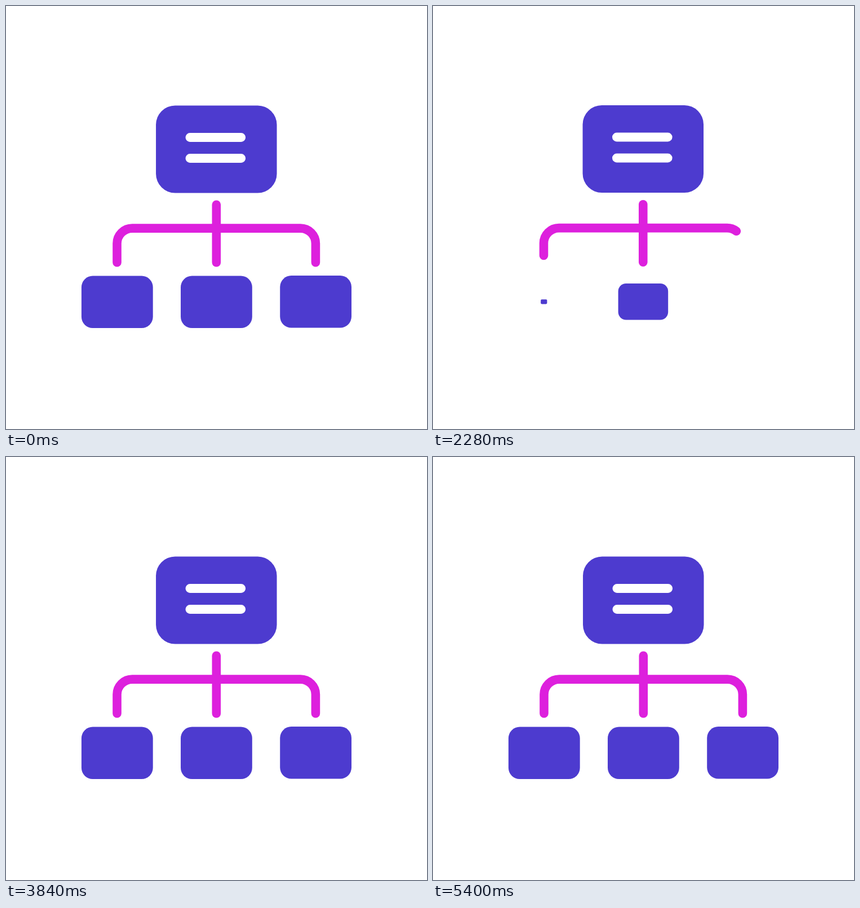
Write an HTML page with a canvas that moves like this. It is 747 by 750 pixels and loops after 5840 ms.

```html
<!DOCTYPE html>
<html lang="en">
<head>
<meta charset="utf-8">
<title>Hierarchy chart</title>
<style>
  html, body { margin: 0; width: 100%; height: 100%; overflow: hidden; background: #fff; }
  canvas { display: block; }
</style>
</head>
<body>
<canvas id="stage" width="747" height="750"></canvas>
<script>
const ctx = document.getElementById('stage').getContext('2d');
const LOOP = 5840, STEP = 20;
const BLUE = '#4d3bcf', PINK = '#dd20dd', WHITE = '#fff';
const REDRAW = 1300, SETTLED = 2500;

const clamp = v => Math.min(1, Math.max(0, v));
const ramp = (t, start, span) => clamp((t - start) / span);
const easeOut = p => 1 - Math.pow(1 - p, 1.5);
const smooth = p => p * p * (3 - 2 * p);
const grow = (t, start, span) => easeOut(ramp(t, start, span));
const pulse = (t, peak) => 1 + 0.1 * smooth(clamp(1 - Math.abs(t - peak) / 350));

// Rounded box scaled about its centre
function box(cx, cy, w, h, r, scale) {
  if (scale <= 0) return;
  ctx.fillStyle = BLUE;
  ctx.beginPath();
  ctx.roundRect(cx - w * scale / 2, cy - h * scale / 2, w * scale, h * scale, r * scale);
  ctx.fill();
}

// First part of a round-capped path
function trace(path, length, part, color, width) {
  if (part <= 0) return;
  ctx.strokeStyle = color;
  ctx.lineWidth = width;
  ctx.lineCap = 'round';
  ctx.setLineDash(part < 1 ? [Math.max(0.01, length * part), 2000] : []);
  ctx.stroke(path);
}

function arm(x) {
  const p = new Path2D();
  p.moveTo(373.3, 394.1);
  p.arcTo(x, 394.1, x, 454.7, 27);
  p.lineTo(x, 454.7);
  return p;
}

const stem = new Path2D('M373.3 352.3V454.7');
const leftArm = arm(197), rightArm = arm(549.4);
const bars = [new Path2D('M326.4 233H417.2'), new Path2D('M326.4 270H417.2')];
const blocks = [
  { x: 373.4, y: 524.8, start: 1848, peak: 4550 },
  { x: 197.3, y: 524.8, start: 2233, peak: 4777 },
  { x: 549.6, y: 524.3, start: 2626, peak: 4335 }
];

function shifted(on, draw) {
  ctx.save();
  if (on) ctx.translate(-0.5, -0.5);
  draw();
  ctx.restore();
}

function render(t) {
  const fresh = t >= REDRAW;
  const moving = fresh && t < SETTLED;
  ctx.clearRect(0, 0, 747, 750);

  shifted(moving, () => {
    box(373.3, 254, 214.5, 155, 34, pulse(t, 4985));
    ctx.globalAlpha = fresh ? 1 : 1 - ramp(t, 1140, 140);
    const part = (start, span) => fresh ? grow(t, start, span) : 1;
    trace(stem, 102.4, part(1383, 510), PINK, 15.6);
    trace(leftArm, 225.3, part(1534, 868), PINK, 15.6);
    trace(rightArm, 225.1, part(1550, 1230), PINK, 15.6);
    for (const b of blocks)
      box(b.x, b.y, 126.8, 92.4, 20, part(b.start, 785) * pulse(t, b.peak));
  });

  shifted(t >= 840 && t < SETTLED, () => {
    const old = t < 840;
    if (old) ctx.globalAlpha = 1 - ramp(t, 500, 140);
    bars.forEach((bar, i) =>
      trace(bar, 90.8, old ? 1 : grow(t, 830 + i * 395, 825), WHITE, 15.8));
  });
}

function tick() {
  const t = performance.now() % LOOP;
  render(Math.floor(t / STEP) * STEP);
  requestAnimationFrame(tick);
}
tick();
</script>
</body>
</html>
```
